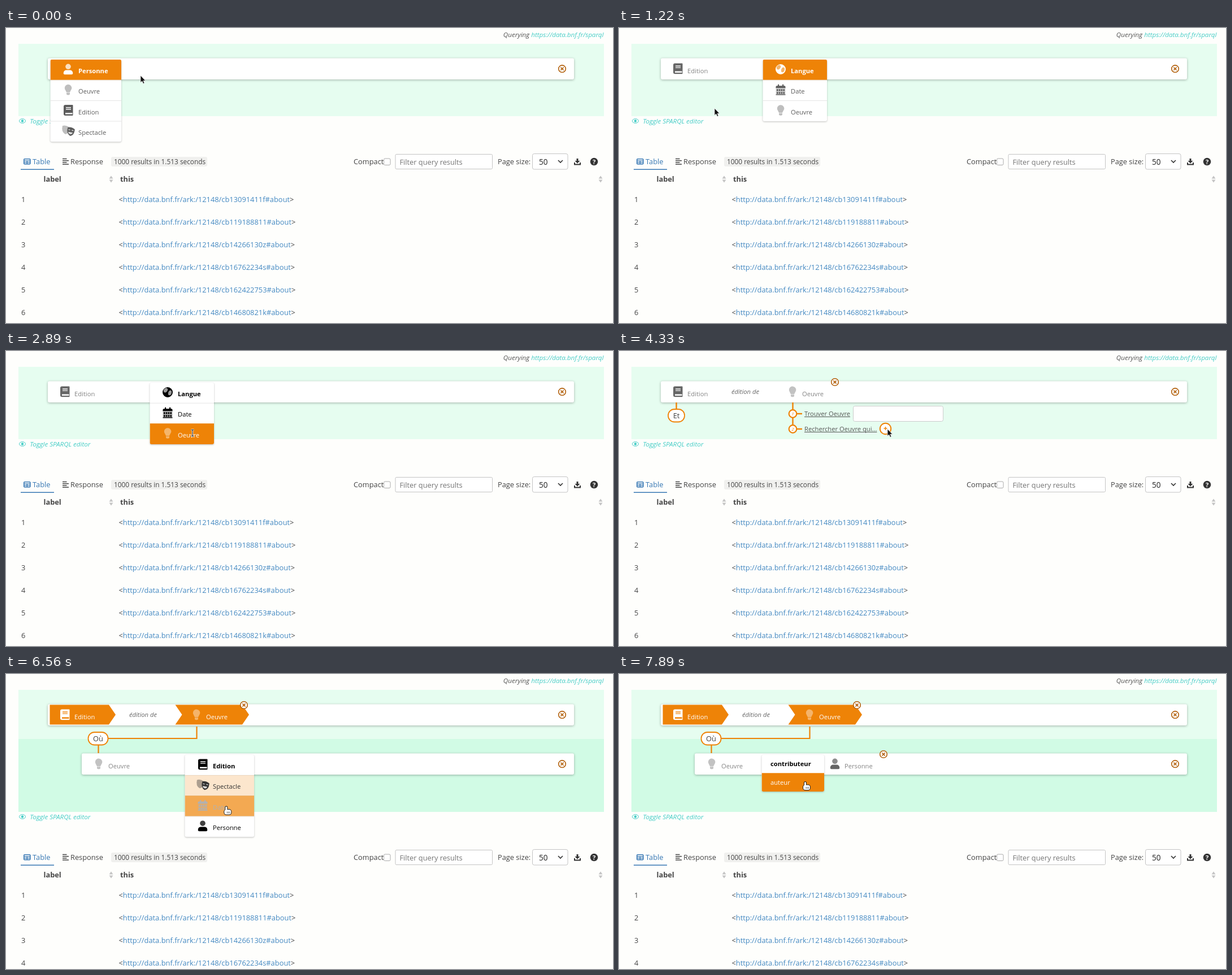
An HTML page with a canvas for the animation above (8000 ms loop, 1074 by 522 pixels).

```html
<!DOCTYPE html>
<html lang="fr">
<head>
<meta charset="utf-8">
<title>Query builder</title>
<style>
html, body { margin: 0; width: 100%; height: 100%; overflow: hidden; background: #fefefc; }
canvas { display: block; width: 1074px; height: 522px; }
</style>
</head>
<body>
<canvas id="stage"></canvas>
<script>
const W = 1074, H = 522, LOOP = 8000, TICK = 1000 / 9;
const FADE = 1.08; // hover fade, in ticks
const ORANGE = '#ee8307', BROWN = '#b3620f', TEAL = '#45cdc6', BLUE = '#3878b4', LINK = '#4489c2';
const INK = '#444', SOFT = '#858585', GREY = '#666';
const BIG = 12.8, SMALL = 11.2, SLANT = 11.65;
const FACE = '"Open Sans", "Noto Sans", sans-serif';

const canvas = document.getElementById('stage');
const c = canvas.getContext('2d');
const dpr = window.devicePixelRatio || 1;
canvas.width = W * dpr;
canvas.height = H * dpr;

const clamp = v => Math.max(0, Math.min(1, v));
const ease = p => p * p * (3 - 2 * p);
const mix = (a, b, p) => Math.round(a + (b - a) * p);

// --- helpers -------------------------------------------------------------
function text(str, x, y, size, color, style = '', align = 'left') {
  c.font = `${style} ${size}px ${FACE}`;
  c.textAlign = align;
  c.fillStyle = color;
  c.fillText(str, x, y);
  return c.measureText(str).width;
}
function paint(fill, stroke, lw) {
  if (fill) { c.fillStyle = fill; c.fill(); }
  if (stroke) { c.strokeStyle = stroke; c.lineWidth = lw; c.stroke(); }
}
function box(x, y, w, h, r, fill, stroke, lw = 1) {
  c.beginPath();
  c.roundRect(x, y, w, h, r);
  paint(fill, stroke, lw);
}
function disc(x, y, r, fill, stroke, lw = 1) {
  c.beginPath();
  c.arc(x, y, r, 0, 7);
  paint(fill, stroke, lw);
}
function shape(pts, fill, stroke, lw) {
  c.beginPath();
  for (let i = 0; i < pts.length; i += 2) c.lineTo(pts[i], pts[i + 1]);
  c.closePath();
  paint(fill, stroke, lw);
}
function line(color, lw, ...pts) {
  c.beginPath();
  for (let i = 0; i < pts.length; i += 2) c.lineTo(pts[i], pts[i + 1]);
  paint(0, color, lw);
}
function shadowed(blur, alpha, draw) {
  c.save();
  c.shadowColor = `rgba(0,0,0,${alpha})`;
  c.shadowBlur = blur * dpr;
  c.shadowOffsetY = dpr;
  draw();
  c.restore();
}
function faint(alpha, draw) {
  c.save();
  c.globalAlpha = alpha;
  draw();
  c.restore();
}
function placed(x, y, angle, draw) {
  c.save();
  c.translate(x, y);
  c.rotate(angle);
  draw();
  c.restore();
}

// --- two-tone icons, about 18 px, centred on the origin ------------------
const icons = {
  person(col) {
    faint(0.75, () => disc(0, -4.7, 4.8, col));
    box(-8.2, 1.5, 16.4, 7.8, [5, 5, 2, 2], col);
  },
  bulb(col) {
    faint(0.4, () => {
      c.beginPath();
      c.arc(0, -3.2, 6.2, 2.5, 0.64);
      c.lineTo(3, 4.5);
      c.lineTo(-3, 4.5);
      paint(col);
      box(-3, 5.2, 6, 4, [0, 0, 2, 2], col);
    });
  },
  book(col) {
    c.beginPath();
    c.roundRect(-8, -9.5, 16.5, 18.8, [3, 1, 1, 3]);
    for (const y of [-5.5, -2.6]) c.rect(-4, y, 9, 1.4);
    c.rect(-5, 4.6, 12.5, 2.4);
    c.fillStyle = col;
    c.fill('evenodd');
  },
  masks(col) {
    const mask = () => {
      c.beginPath();
      c.moveTo(-6, -6);
      c.quadraticCurveTo(0, -9, 7, -5);
      c.quadraticCurveTo(8, 6, 1, 8);
      c.quadraticCurveTo(-7, 5, -6, -6);
      paint(col);
    };
    placed(-5, -2, 0.15, () => faint(0.4, mask));
    placed(4, 1, 0.2, () => {
      mask();
      for (const x of [-4, 2]) box(x, -3, 3, 1.3, 0, 'rgba(255,255,255,.8)');
      c.beginPath();
      c.arc(0.5, 1, 4, 0.1, 3.04);
      paint('rgba(255,255,255,.8)');
    });
  },
  globe(col) {
    const land = () => {
      c.ellipse(-3.5, -3.5, 3, 4.2, 0.7, 0, 7);
      c.closePath();
      c.ellipse(4, 1, 2.8, 4.4, 0.3, 0, 7);
      c.closePath();
    };
    c.beginPath();
    c.arc(0, 0, 9, 0, 7);
    c.closePath();
    land();
    c.fillStyle = col;
    c.fill('evenodd');
    faint(0.4, () => { c.beginPath(); land(); paint(col); });
  },
  calendar(col) {
    faint(0.3, () => box(-8.5, -3, 17, 12, [0, 0, 2, 2], col));
    box(-8.5, -7, 17, 4, [2, 2, 0, 0], col);
    for (const x of [-5, 3]) c.fillRect(x, -9.5, 2.2, 3);
    for (let i = 0; i < 8; i++) c.fillRect(-7 + (i % 4) * 3.8, -1 + (i >> 2) * 5, 2.6, 3.2);
    c.fillRect(-8.5, 8, 17, 1.4);
  }
};
const icon = (name, x, y, col) => placed(x, y, 0, () => icons[name](col));

function close(x, y) {
  disc(x, y, 6.3, '#fff', BROWN, 1.6);
  for (const d of [-2.6, 2.6]) line(BROWN, 1.6, x - 2.6, y - d, x + 2.6, y + d);
}
function entry(name, label, x, y, col = GREY) {
  icon(name, x, y, col);
  text(label, x + 17, y + 8, SMALL, col === GREY ? SOFT : col);
}
function bar(x, y) {
  shadowed(4, 0.3, () => box(x, y, 1005 - x, 37.5, 3, '#fff'));
  close(984, y + 18.7);
}
function pill(label, x, w) {
  box(x - w / 2, 103, w, 22.5, 11, '#fff', ORANGE, 1.8);
  text(label, x, 118.8, BIG, INK, '', 'center');
}
function ribbon(x, w, notch) {
  shape([x, 54.5, x + w - 12, 54.5, x + w, 72, x + w - 12, 89.5, x, 89.5, x + notch, 72], ORANGE);
}

// --- pointer: [first tick, last tick, x, y] ------------------------------
const moves = [
  [0, 0, 238, 84], [2, 6, 168, 146], [8, 10, 169, 142], [14, 21, 330, 145], [30, 37, 475, 138],
  [44, 47, 457, 155], [50, 54, 392, 162], [55.3, 61.3, 388, 270], [67, 71, 329, 191]
];
function pointerAt(k) {
  let [, , x, y] = moves[0];
  for (const [from, to, tx, ty] of moves.slice(1)) {
    const p = ease(clamp((k - from) / (to - from)));
    x += (tx - x) * p;
    y += (ty - y) * p;
  }
  return [x, y];
}
function arrow() {
  shape([0, 0, 0, 12.5, 2.8, 10, 4.8, 14.5, 6.9, 13.6, 5, 9.3, 8.8, 9.3], '#111', '#fff', 0.7);
}
function beam() {
  for (const [col, lw] of [['#fff', 2.6], ['#222', 1.1]]) {
    line(col, lw, 0, -5, 0, 5);
    for (const y of [-5.5, 5.5]) line(col, lw, -2.5, y, 2.5, y);
  }
}
function hand() {
  c.beginPath();
  c.roundRect(-1, 0, 3, 9, 1.5);
  c.roundRect(-3, 5.5, 12, 8.5, 3.5);
  paint(0, '#222', 2);
  paint('#fff');
  for (const x of [2, 4.2, 6.4]) line('#222', 0.7, x, 9, x, 12);
}

// --- menus ---------------------------------------------------------------
const STEP = 36.3;
const menus = [
  { from: 0, to: 9, x: 78.5, y: 56, w: 125.5, h: STEP,
    items: ['person Personne', 'bulb Oeuvre', 'book Edition', 'masks Spectacle'] },
  { from: 10, to: 27, x: 254.5, y: 56, w: 113.5, h: STEP,
    items: ['globe Langue', 'calendar Date', 'bulb Oeuvre'] },
  { from: 41, to: 66, x: 316.5, y: 143, w: 122.5, h: STEP,
    items: ['book Edition', 'masks Spectacle', 'calendar Date', 'person Personne'] },
  { from: 66, to: 72, x: 252.5, y: 143, w: 110.5, h: 32.5,
    items: [' contributeur', ' auteur'] }
];
const isOpen = (m, k) => k >= m.from && k < m.to;

function rowAt(m, k) {
  const [x, y] = pointerAt(k);
  const row = Math.floor((y - m.y) / m.h);
  return x >= m.x && x < m.x + m.w && row < m.items.length ? row : -1;
}
// replays the pointer to get each row's highlight; the last row touched keeps it
function hoverState(m, k) {
  const dt = 0.05, glow = m.items.map((_, i) => i ? 0 : 1);
  let active = 0, dark = 0;
  for (let t = m.from; t < k; t += dt) {
    const row = rowAt(m, t);
    if (row >= 0) active = row;
    if (row >= 0 || dark) dark = clamp(dark + dt / FADE);
    glow.forEach((v, i) => { glow[i] = clamp(v + (i === active ? 1 : -1.15) * dt / FADE); });
  }
  return { glow, dark };
}
function drawMenu(m, k) {
  const { x, y, w, h, items } = m;
  const { glow, dark } = hoverState(m, k);
  shadowed(3, 0.25, () => box(x, y, w, h * items.length, 3, '#fff'));
  c.save();
  c.beginPath();
  c.roundRect(x, y - 0.3, w, h * items.length + 0.3, 3);
  c.clip();
  items.forEach((item, i) => {
    const [name, label] = item.split(' ');
    const top = y + i * h;
    if (i && name) box(x, top - 0.5, w, 1, 0, '#e6e6e6');
    faint(glow[i], () => box(x, top - 0.3, w, h + 0.3, 0, ORANGE));
    const g = mix(mix(92, 0, dark), 255, glow[i]);
    const col = `rgb(${g},${g},${g})`;
    if (name) icon(name, x + 31.5, top + 17, col);
    text(label, x + (name ? 49.5 : 15.5), top + (name ? 24 : 20), SMALL, col, i ? '' : 'bold');
  });
  c.restore();
}

// --- page ----------------------------------------------------------------
function sorter(x, y) {
  for (const d of [-1, 1]) shape([x - 3.5, y + d, x, y + 6 * d, x + 3.5, y + d], '#c4c4c4');
}
function toggle() {
  c.beginPath();
  c.ellipse(29, 164.5, 5.5, 3.8, 0, 0, 7);
  paint(0, TEAL, 1);
  disc(29, 164.5, 2.2, TEAL);
  text('Toggle SPARQL editor', 42.3, 168.5, SLANT, TEAL, 'italic');
}
function tabs() {
  box(31.8, 231.8, 11, 9, 1, 0, BLUE, 1.6);
  for (const y of [235, 238]) line(BLUE, 1.2, 32, y, 43, y);
  line(BLUE, 1.4, 37.3, 235, 37.3, 241);
  text('Table', 47, 241, BIG, BLUE);
  box(26, 249.5, 59, 1.6, 0, BLUE);
  for (let i = 0; i < 4; i++) {
    const y = 231.5 + i * 3.2;
    line(INK, 1.5, 100, y, i % 2 ? 111 : 107.5, y);
  }
  text('Response', 114, 241, BIG, INK);
  box(186, 228, 170, 17, 3, '#f0f0ee');
  text('1000 results in 1.513 seconds', 191, 241, 11.85, INK);
}
function controls() {
  text('Compact', 615, 241, BIG, INK);
  box(668.5, 231, 11.5, 11.5, 2, '#fff', '#aaa');
  box(689, 223.5, 171.5, 26, 2, '#fff', '#c4c4c4');
  text('Filter query results', 696.5, 241.5, BIG, '#757575');
  text('Page size:', 870, 241, BIG, INK);
  box(931.5, 222.5, 62.5, 27.5, 3, '#fff', '#c4c4c4');
  text('50', 943, 241.5, 13.6, '#222');
  line('#333', 1.6, 977, 234, 981, 238, 985, 234);
  box(1009.5, 231, 3, 5, 0, '#333');
  shape([1006.5, 235, 1015.5, 235, 1011, 239.5], '#333');
  line('#333', 2, 1006, 238, 1006, 241.5, 1016, 241.5, 1016, 238);
  disc(1040.5, 236.5, 6.8, '#333');
  text('?', 1040.5, 240.5, 11, '#fff', 'bold', 'center');
}
function table() {
  text('label', 66.5, 272, BIG, INK, 'bold');
  text('this', 202, 272, BIG, INK, 'bold');
  for (const x of [186, 1052]) sorter(x, 267.5);
  ['13091411f', '119188811', '14266130z', '16762234s', '162422753', '14680821k'].forEach((id, i) => {
    const y = 308 + i * 40;
    text(i + 1, 27, y, BIG, INK);
    let x = 199.5;
    x += text('<', x, y, BIG, INK);
    x += text(`http://data.bnf.fr/ark:/12148/cb${id}#about`, x, y, 12.87, LINK);
    text('>', x, y, BIG, INK);
  });
}
function branches() {
  line(ORANGE, 2.4, 101.5, 91, 101.5, 103);
  pill('Et', 101.5, 29);
  line(ORANGE, 2.4, 307.5, 91, 307.5, 138);
  ['Trouver Oeuvre', 'Rechercher Oeuvre qui...'].forEach((label, i) => {
    const y = 111 + i * 27;
    line(ORANGE, 2.4, 314, y, 324, y);
    disc(307.5, y, 6.8, '#fff', ORANGE, 2.2);
    text(i + 1, 307.5, y + 3, 8, ORANGE, 'italic', 'center');
    const w = text(label, 328, y + 3.5, SMALL, '#555');
    box(328, y + 5, w, 1, 0, '#555');
  });
  box(414.5, 97.5, 159, 27, 3, '#fff', '#ccc');
  disc(471.5, 137.5, 9.7, '#fff', ORANGE, 2);
  line(ORANGE, 1.5, 468.5, 137, 474.5, 137);
  line(ORANGE, 1.5, 471.5, 134, 471.5, 140);
}
function nestedQuery(k) {
  ribbon(77.5, 116.5, 0);
  ribbon(299.5, 130.5, 12);
  entry('book', 'Edition', 104, 72, '#fff');
  text('édition de', 218, 76, SMALL, GREY, 'italic');
  entry('bulb', 'Oeuvre', 337, 72, '#fff');
  close(421, 55);
  line(ORANGE, 2.2, 337.5, 93, 337.5, 114, 181, 114);
  line(ORANGE, 2.2, 163.5, 125, 163.5, 140);
  pill('Où', 163, 35);
  bar(134, 140.5);
  entry('bulb', 'Oeuvre', 164, 159);
  if (k < 66) return;
  entry('person', 'Personne', 382, 159);
  close(468, 142);
}
function firstQuery(k) {
  if (k >= 9) entry('book', 'Edition', 104, 72);
  if (k < 27) return;
  text('édition de', 199, 76, SMALL, GREY, 'italic');
  entry('bulb', 'Oeuvre', 307, 72);
  close(382, 55);
  branches();
}
function page(k) {
  const nested = k >= 40;
  box(0, 0, W, H, 0, '#fefefc');
  const w = text('https://data.bnf.fr/sparql', 1057.5, 16, SLANT, TEAL, 'italic', 'right');
  text('Querying ', 1057.5 - w, 16, SLANT, '#555', 'italic', 'right');

  box(22, 28, 1036, 128, 0, '#e6fdf0');
  if (nested) box(22, 115, 1036, 129, 0, '#d1fbe5');
  placed(0, nested ? 88 : 0, 0, () => { toggle(); tabs(); controls(); table(); });
  bar(74, 53.5);
  (nested ? nestedQuery : firstQuery)(k);
}

function draw(now) {
  const k = Math.floor(((now % LOOP) + 5) / TICK) % 72; // nine pictures a second
  c.setTransform(dpr, 0, 0, dpr, 0, 0);
  page(k);
  const menu = menus.find(m => isOpen(m, k));
  if (menu) drawMenu(menu, k);
  const typing = k >= 26 && k < 31;
  const cursor = typing ? beam : menu && rowAt(menu, k) >= 0 ? hand : arrow;
  placed(...pointerAt(k), 0, cursor);
  requestAnimationFrame(draw);
}
draw(0);
</script>
</body>
</html>
```
